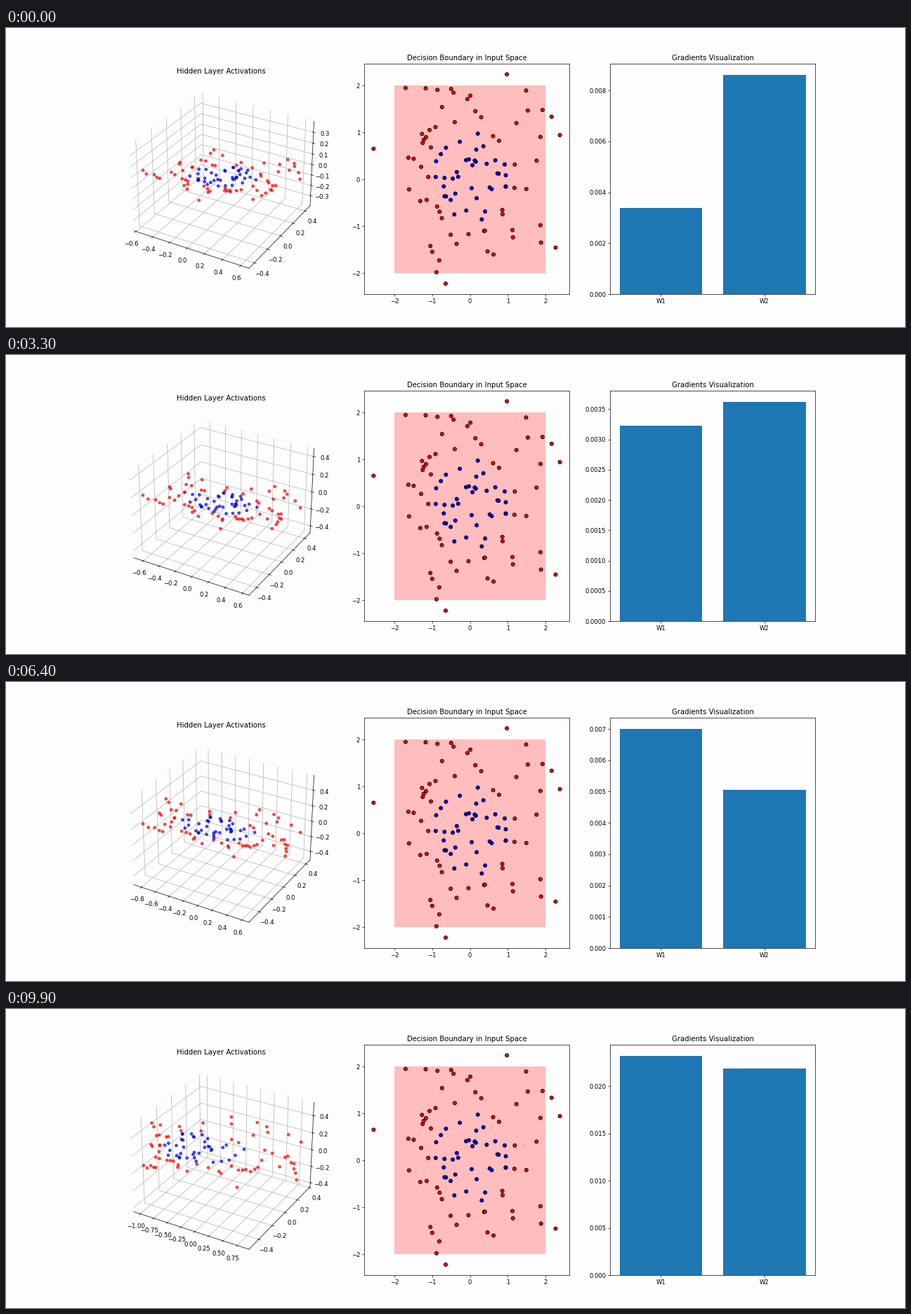
Recreate the animation shown at these times as a matplotlib script. Size 1280 px wide and 427 px high, loop 10 s.

```python
import numpy as np
import matplotlib.pyplot as plt
from matplotlib.animation import FuncAnimation
from matplotlib.patches import Rectangle

FRAMES, INTERVAL = 100, 100
STEPS_PER_FRAME = 10
WARM_UP = 10
RATE = 0.1
DPI = 1280 / 21
PAPER = "#fdfdfd"
PINK = "#ffbdbd"


def make_data(count=100):
    """Random points, labelled by whether they lie outside the unit circle."""
    np.random.seed(0)
    points = np.random.randn(count, 2)
    labels = ((points ** 2).sum(axis=1) > 1).astype(float)
    return points, labels.reshape(-1, 1)


class Network:
    """A 2-3-1 tanh network with a sigmoid output and cross-entropy loss."""

    def __init__(self):
        np.random.seed(0)
        self.w1 = np.random.randn(2, 3) * 0.1
        self.w2 = np.random.randn(3, 1) * 0.1
        self.b1 = np.zeros((1, 3))
        self.b2 = np.zeros((1, 1))

    def train(self, x, y, steps):
        for _ in range(steps):
            hidden = np.tanh(x @ self.w1 + self.b1)
            output = 1 / (1 + np.exp(-(hidden @ self.w2 + self.b2)))
            d_out = (output - y) / len(x)
            d_hidden = d_out @ self.w2.T * (1 - hidden ** 2)
            grad1, grad2 = x.T @ d_hidden, hidden.T @ d_out
            self.w1 -= RATE * grad1
            self.b1 -= RATE * d_hidden.sum(axis=0)
            self.w2 -= RATE * grad2
            self.b2 -= RATE * d_out.sum(axis=0)
        return hidden, (np.linalg.norm(grad1), np.linalg.norm(grad2))


def record_training():
    net = Network()
    net.train(X, Y, WARM_UP)
    return [net.train(X, Y, STEPS_PER_FRAME) for _ in range(FRAMES)]


X, Y = make_data()
COLORS = np.where(Y.ravel() > 0.5, "red", "blue")
HISTORY = record_training()

fig = plt.figure(figsize=(1280.01 / DPI, 427.01 / DPI), dpi=DPI, facecolor=PAPER)
ax_hidden = fig.add_subplot(131, projection="3d")
ax_input = fig.add_subplot(132, facecolor=PAPER)
ax_grad = fig.add_subplot(133, facecolor=PAPER)

ax_input.add_patch(Rectangle((-2, -2), 4, 4, facecolor=PINK, linewidth=0, zorder=0))
ax_input.scatter(X[:, 0], X[:, 1], c=COLORS, edgecolors="black")
ax_input.set_title("Decision Boundary in Input Space")


def draw_hidden(hidden):
    ax_hidden.clear()
    ax_hidden.set_facecolor(PAPER)
    for axis in (ax_hidden.xaxis, ax_hidden.yaxis, ax_hidden.zaxis):
        axis.pane.set_facecolor(PAPER)
        axis.pane.set_edgecolor("#f0f0f0")
    ax_hidden.scatter(*hidden.T, c=COLORS, alpha=0.7, depthshade=False)
    ax_hidden.set_title("Hidden Layer Activations")


def draw_gradients(norms):
    ax_grad.clear()
    ax_grad.bar(["W1", "W2"], norms, color="tab:blue")
    ax_grad.set_title("Gradients Visualization")


def update(frame):
    hidden, norms = HISTORY[frame]
    draw_hidden(hidden)
    draw_gradients(norms)
    return []


def init():
    return update(0)


animation = FuncAnimation(fig, update, frames=FRAMES, init_func=init,
                          interval=INTERVAL, repeat=True, repeat_delay=0)
plt.show()
```
